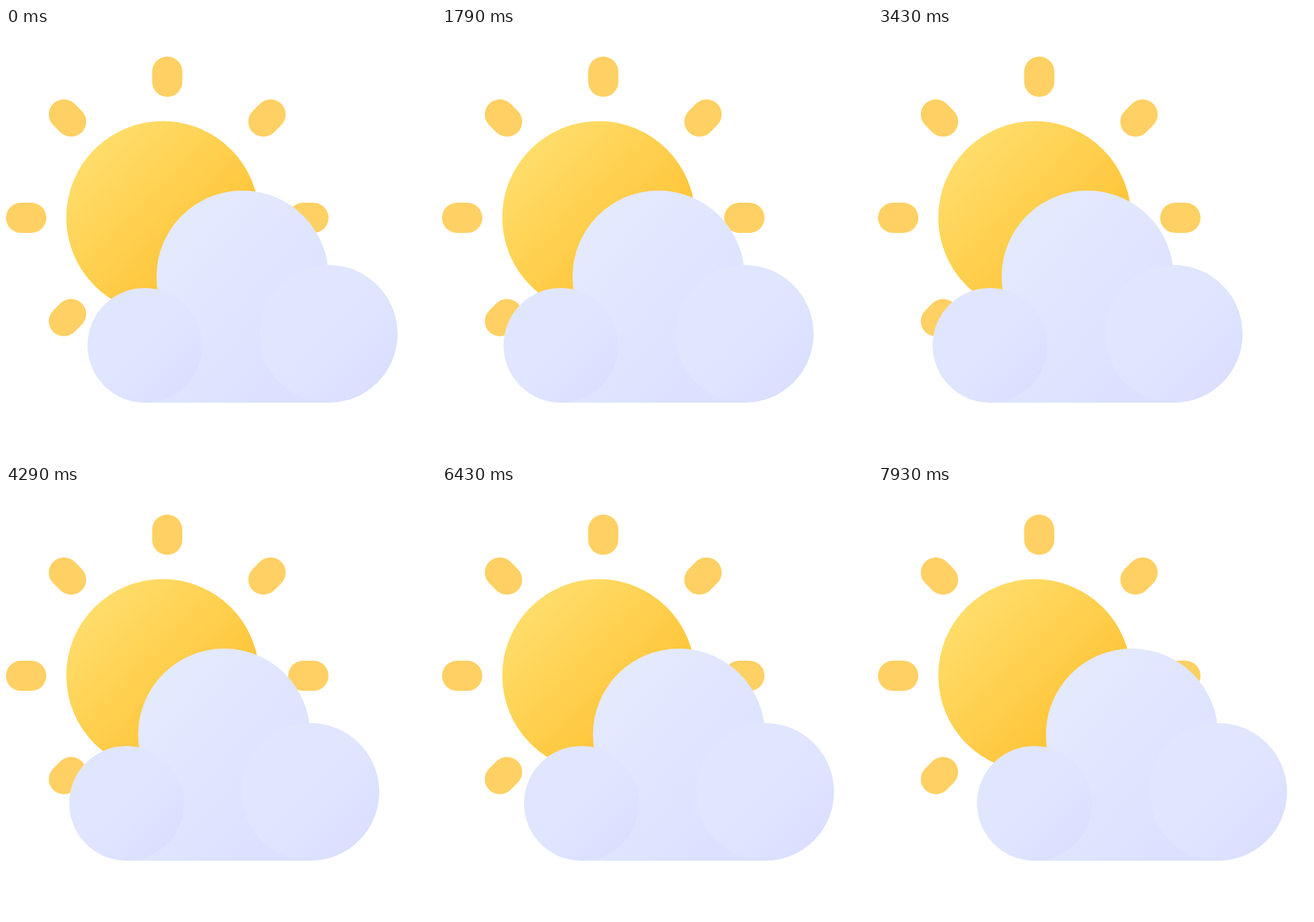
An HTML page that plays this animation: 640 by 640 pixels, repeating every 8000 ms.

```html
<!DOCTYPE html>
<html lang="en">
<head>
<meta charset="utf-8">
<title>Partly cloudy</title>
<style>
  html, body { margin: 0; width: 100%; height: 100%; overflow: hidden; background: #fff; }
  svg { display: block; width: 100%; height: 100%; }
</style>
</head>
<body>
<svg viewBox="0 0 640 640">
  <defs>
    <linearGradient id="sunFill" x1=".1" y1=".15" x2=".8" y2=".85">
      <stop offset="0" stop-color="#ffde6c"/>
      <stop offset="1" stop-color="#ffc02f"/>
    </linearGradient>
    <linearGradient id="bodyFill" gradientUnits="userSpaceOnUse" x1="250" y1="300" x2="455" y2="480">
      <stop offset="0" stop-color="#e4eafe"/>
      <stop offset="1" stop-color="#dce1ff"/>
    </linearGradient>
    <linearGradient id="puffFill" x1=".1" y1=".1" x2=".88" y2=".88">
      <stop offset=".45" stop-color="#e1e6ff"/>
      <stop offset="1" stop-color="#dadfff"/>
    </linearGradient>
  </defs>
  <g id="rays" fill="#ffd063"></g>
  <circle cx="233.2" cy="282" r="143.5" fill="url(#sunFill)"/>
  <g id="cloud">
    <path d="M206.7 557.7V472.3H224V370a128 128 0 0 1 256 0V557.7Z" fill="none"/>
    <g fill="url(#bodyFill)">
      <circle cx="352" cy="370" r="128"/>
      <rect x="206.7" y="472.3" width="273.6" height="85.4"/>
    </g>
    <g fill="url(#puffFill)">
      <circle cx="206.7" cy="472.3" r="85.4"/>
      <circle cx="480.3" cy="455.2" r="102.5"/>
    </g>
  </g>
</svg>
<script>
  const LOOP = 8000;
  const FPS = 14;
  const START = 121.3;

  // [time in ms, left edge of the cloud]
  const drift = [
    [0, 121.3], [2571, 78.5], [2950, 68.9], [3430, 81.3], [4290, 94.1],
    [5210, 106], [6000, 115.9], [6430, 122], [8000, 148.5]
  ];

  const rays = document.getElementById('rays');
  const cloud = document.getElementById('cloud');

  for (let angle = 0; angle < 360; angle += 45) {
    const ray = document.createElementNS('http://www.w3.org/2000/svg', 'rect');
    const box = { x: 217.5, y: 42.5, width: 45, height: 60, rx: 22.5,
                  transform: `rotate(${angle} 240 282.5)` };
    for (const key in box) ray.setAttribute(key, box[key]);
    rays.append(ray);
  }

  function leftAt(time) {
    const i = drift.findIndex(([end], n) => n > 0 && time <= end);
    const [t0, x0] = drift[i - 1];
    const [t1, x1] = drift[i];
    return x0 + (x1 - x0) * (time - t0) / (t1 - t0);
  }

  function draw(ms) {
    // The cloud advances in discrete steps
    const step = Math.floor((ms % LOOP + 5) * FPS / 1000) % (LOOP * FPS / 1000);
    const dx = leftAt(step * 1000 / FPS) - START;
    cloud.setAttribute('transform', `translate(${dx.toFixed(2)} 0)`);
  }

  const began = performance.now();
  function tick() {
    draw(performance.now() - began);
    requestAnimationFrame(tick);
  }
  draw(0);
  requestAnimationFrame(tick);
</script>
</body>
</html>
```
